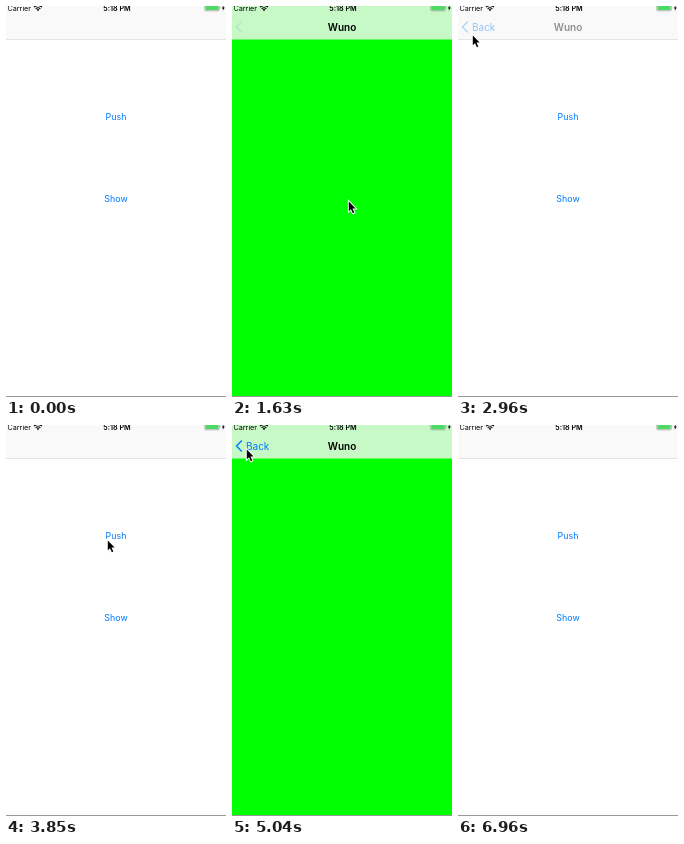
Recreate the animation shown at these times as an HTML page. Size 220 by 391 pixels, loop 7060 ms.

```html
<!DOCTYPE html>
<html lang="en">
<head>
<meta charset="utf-8">
<title>Circle transition</title>
<style>
  html, body { margin: 0; width: 100%; height: 100%; overflow: hidden; background: #fff; }
  svg { display: block; width: 100%; height: 100%; }
  text { font-family: Inter, Roboto, sans-serif; }
  .mid { text-anchor: middle; }
  .btn { font-size: 8.9px; fill: #007aff; text-anchor: middle; }
</style>
</head>
<body>
<svg viewBox="0 0 220 391">
  <rect width="220" height="391" fill="#fff"/>
  <text id="push" class="btn" x="110" y="114">Push</text>
  <text id="show" class="btn" x="110" y="196.3">Show</text>
  <rect y="33" width="220" height="1" fill-opacity=".16"/>
  <circle id="disc" cx="110" fill="#0f0"/>

  <rect width="220" height="33.5" fill="#f8f8f8" fill-opacity=".8"/>
  <text id="title" class="mid" x="110" y="24.5" font-size="10" font-weight="600">Wuno</text>
  <path id="chevron" d="M9.8 15.5L4.5 21L9.8 26.5" fill="none" stroke="#007aff" stroke-width="1.4"/>
  <text id="back" x="14" y="24.5" font-size="10" fill="#007aff">Back</text>

  <g id="status">
    <text x="1.5" y="5" font-size="7.2">Carrier</text>
    <g fill="none" stroke="#000" stroke-width="1.1">
      <path d="M28 1.2Q32 -2.2 36 1.2M29.6 2.8Q32 .8 34.4 2.8"/>
    </g>
    <path d="M30.6 3.6Q32 2.5 33.4 3.6L32 5.2Z"/>
    <text class="mid" x="111" y="5" font-size="7.2" font-weight="600">5:18 PM</text>
    <rect x="198.8" y="-1.2" width="14.4" height="6" rx="1" fill="none" stroke="#666" stroke-width=".5"/>
    <rect x="199.5" y="-.5" width="13" height="4.6" rx=".5" fill="#4cd964"/>
    <path d="M213.8 .8v2.2q1-1.1 0-2.2Z" fill="#666"/>
    <path d="M217.8 -1L215.8 2.4H217.2L216.6 5L218.8 1.6H217.4Z"/>
  </g>

  <rect y="390" width="220" height="1" fill="#999"/>
  <path id="cursor" d="M.8 1.4V11.3L3 9.2L4.9 13.2L6.3 12.5L4.5 8.6H7.6Z"
        stroke="#fff" stroke-width="1.9" paint-order="stroke"/>
</svg>
<script>
const LOOP = 7060, STEP = 1000 / 6.75;
const GROW = 174.3;
const $ = id => document.getElementById(id);
const parts = {};
for (const id of ['push', 'show', 'disc', 'title', 'chevron', 'back', 'cursor']) parts[id] = $(id);

const visits = [
  { button: 'show', y: 190, press: 9, held: 19, pop: 20 },
  { button: 'push', y: 108, press: 28, held: 36, pop: 36 }
];
// step, x, y of the pointer tip
const path = [
  [3, 201, 140], [7, 116, 194], [11, 116, 194], [16, 13, 20], [17, 14, 28],
  [21, 14, 28], [26, 101, 114], [30, 101, 114], [34, 14, 23], [36, 14, 23], [39, -14, -20]
];

const ramp = (v, a, b) => Math.min(1, Math.max(0, (v - a) / (b - a)));
const smooth = p => p * p * (3 - 2 * p);
const alpha = (id, a) => parts[id].setAttribute('opacity', a.toFixed(3));

function pointer(k) {
  if (k < path[0][0] || k >= path[path.length - 1][0]) return null;
  const i = path.findIndex(p => p[0] > k);
  const [k0, x0, y0] = path[i - 1], [k1, x1, y1] = path[i];
  const p = smooth(ramp(k, k0, k1));
  return [x0 + (x1 - x0) * p, y0 + (y1 - y0) * p];
}

function draw(t) {
  const k = Math.floor((t + 9) / STEP);
  let radius = 0, title = 0, chevron = 0, back = 0;
  alpha('push', 1);
  alpha('show', 1);

  for (const v of visits) {
    const shown = (k - v.press) * STEP;
    if (shown < 0) continue;
    if (k === v.press) alpha(v.button, .25);
    if (k < v.pop) {
      const p = ramp(shown, 0, GROW);
      const reach = Math.hypot(110, Math.max(v.y, 391 - v.y)) + (p === 1 ? 2 : 0);
      radius = reach * p;
      parts.disc.setAttribute('cy', v.y);
      title = p * p;
      chevron = k >= v.held ? .3 : ramp(shown, 275, 450);
      back = k >= v.held ? .1 : ramp(shown, 296, 592);
    } else {
      const left = 1 - ramp((k - v.pop) * STEP, 0, 296);
      title = .42 * left;
      chevron = .28 * left;
      back = .42 * left;
    }
  }

  parts.disc.setAttribute('r', radius.toFixed(2));
  alpha('title', title);
  alpha('chevron', chevron);
  alpha('back', back);

  const at = pointer(k);
  alpha('cursor', at ? 1 : 0);
  if (at) parts.cursor.setAttribute('transform', `translate(${at[0].toFixed(2)} ${at[1].toFixed(2)})`);
}

const start = performance.now();
function tick() {
  draw((performance.now() - start) % LOOP);
  requestAnimationFrame(tick);
}
draw(0);
requestAnimationFrame(tick);
</script>
</body>
</html>
```
